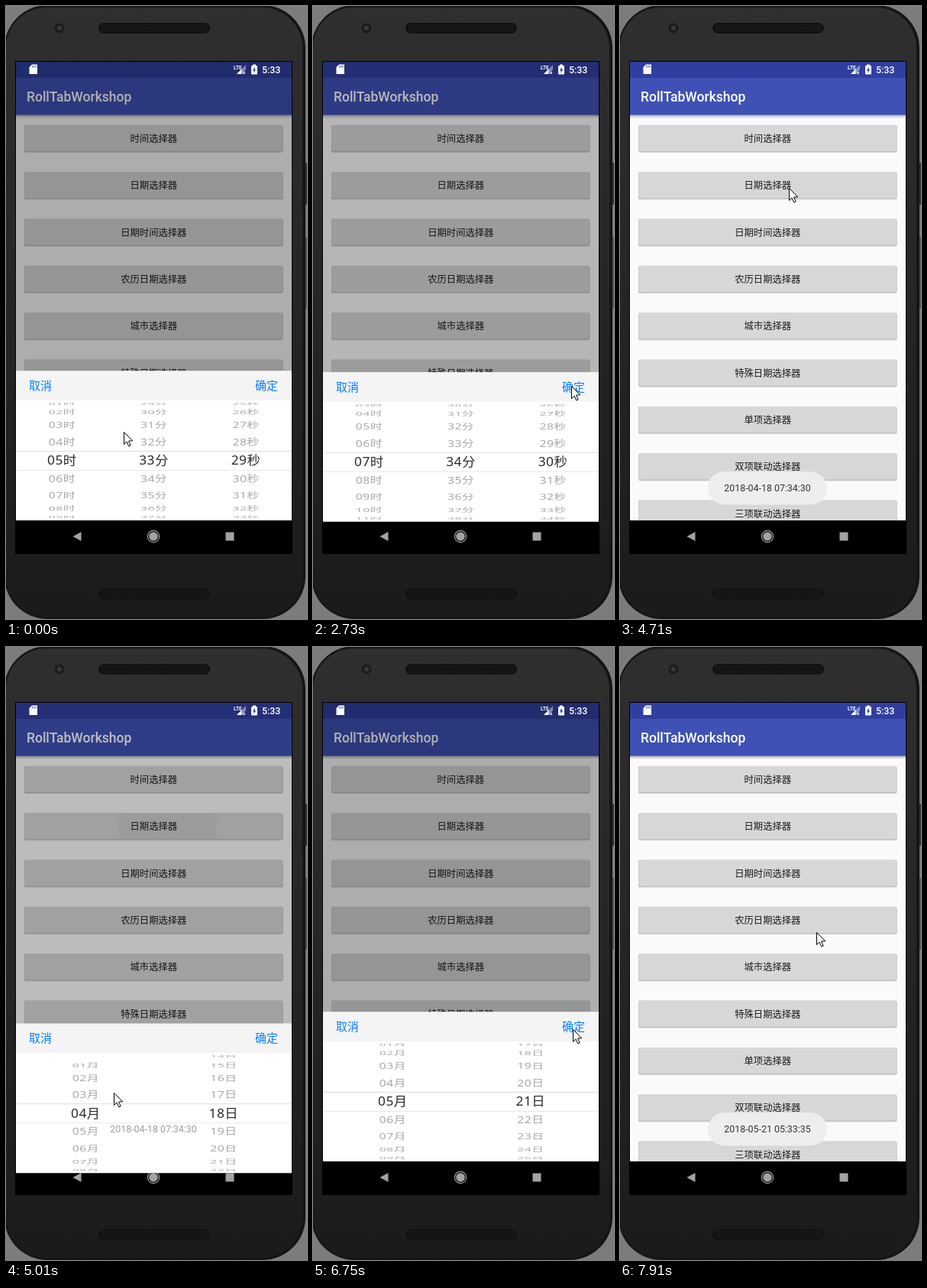
Animation, 394 px wide and 802 px high, one loop 8000 ms. Source, as an HTML page with a canvas:

```html
<!DOCTYPE html>
<html lang="zh">
<head>
<meta charset="utf-8">
<style>
html, body { margin: 0; width: 100%; height: 100%; overflow: hidden; background: #7c7c7c; }
canvas { display: block; }
</style>
</head>
<body>
<canvas id="stage" width="394" height="802"></canvas>
<script>
const c = document.getElementById('stage').getContext('2d');
const LOOP = 8000, TICK = 145;
const CJK = '"Noto Sans CJK SC", "Noto Sans CJK", sans-serif';
const UI = 'Roboto, ' + CJK;
const WHEEL = '"Noto Sans", "Noto Sans CJK SC", sans-serif';
const LABELS = ['时间', '日期', '日期时间', '农历日期', '城市', '特殊日期', '单项', '双项联动', '三项联动'];

// The picture refreshes every TICK, counted anew from each of these moments
const MOMENTS = [0, 1640, 2730, 3700, 5010, 6750, 7910];

// Pointer moves: start, end, x, y
const MOVES = [[120, 400, 84, 620], [400, 800, 80, 575], [800, 1060, 205, 600], [1480, 1640, 321, 575],
  [1780, 2450, 338, 497], [3600, 3700, 317, 475], [3700, 4280, 221, 238], [4710, 5010, 141, 583],
  [5010, 5580, 108, 595], [5580, 5850, 280, 620], [5850, 6450, 288, 552], [6450, 6750, 340, 500],
  [7490, 7910, 257, 373]];

const clamp = v => Math.max(0, Math.min(1, v));
const ramp = (t, start, end, a = 0, b = 1) => a + (b - a) * clamp((t - start) / (end - start));

function box(x, y, w, h, fill, r = 0) {
  c.fillStyle = fill;
  c.beginPath();
  c.roundRect(x, y, w, h, r);
  c.fill();
}

function disc(x, y, r, fill) {
  c.fillStyle = fill;
  c.beginPath();
  c.arc(x, y, r, 0, 7);
  c.fill();
}

function poly(fill, ...p) {
  c.fillStyle = fill;
  c.beginPath();
  for (let i = 0; i < p.length; i += 2) c.lineTo(p[i], p[i + 1]);
  c.closePath();
  c.fill();
}

function text(str, x, y, size, fill, align = 'center', family = CJK, weight = 400) {
  c.font = `${weight} ${size}px ${family}`;
  c.textAlign = align;
  c.fillStyle = fill;
  c.fillText(str, x, y);
}

function clipped(rects, draw) {
  c.save();
  c.beginPath();
  rects.forEach(r => c.rect(...r));
  c.clip();
  draw();
  c.restore();
}

function grille(y) {
  box(121, y, 146, 14, '#111', 7);
  c.fillStyle = '#2c2c2c';
  for (let j = 0; j < 5; j++)
    for (let x = 125 + j % 2; x < 264; x += 2.5) c.fillRect(x, y + 2 + j * 2.3, 1, 1);
}

function phone() {
  box(0, 0, 394, 802, '#7c7c7c');
  box(390, 205, 4, 55, '#333', 1);
  box(390, 302, 4, 94, '#555', 1);
  box(-2, -1, 394, 803, '#151515', 56);
  const g = c.createLinearGradient(0, 0, 0, 802);
  g.addColorStop(0, '#2f2f2f');
  g.addColorStop(0.5, '#252525');
  g.addColorStop(0.9, '#1d1d1d');
  g.addColorStop(1, '#1b1b1b');
  box(0, 2, 388, 797, g, 53);
  disc(70, 29, 6.5, '#1c1c1c');
  disc(70, 29, 3, '#3a3a3d');
  grille(22);
  grille(762);
  box(12, 72, 363, 645, '#000');
}

function page(t) {
  box(13, 73, 361, 600, '#fafafa');
  const shade = c.createLinearGradient(0, 142, 0, 147);
  shade.addColorStop(0, '#0005');
  shade.addColorStop(1, '#0000');
  box(13, 142, 361, 5, shade);
  box(13, 73, 361, 21, '#303f9f');
  box(13, 94, 361, 48.5, '#3f51b5');
  text('RollTabWorkshop', 27, 125, 17.5, '#fff', 'left', UI, 500);
  LABELS.forEach((label, i) => {
    const y = 155.8 + 61.35 * i;
    box(24, y, 338.5, 36.2, '#0002', 2);
    box(24, y + 0.5, 338.5, 34.8, '#b9baba', 2);
    box(24.3, y, 338, 34.3, '#d6d7d7', 2);
    if (i === 1 && t >= 4710 && t < 5290) clipped([[24.3, y, 338, 34.3]], () =>
      disc(212, 235, ramp(t, 4710, 5010, 12, 64), 'rgba(70,110,85,.06)'));
    text(label + '选择器', 193.3, Math.round(y + 22.2), 12.3, '#1c1c1c');
  });
}

function statusBar() {
  poly('#fff', 34, 76.5, 41, 76.5, 41, 89, 30.5, 89, 30.5, 80);
  c.fillStyle = '#303f9f';
  for (const x of [34.2, 36.4, 38.6]) c.fillRect(x, 78, 1, 2.5);
  text('LTE', 298, 82.5, 6.6, '#fff', 'left', UI, 700);
  poly('#ffffff70', 302, 89, 314, 77, 314, 83, 309, 89);
  poly('#fff', 302, 89, 308.5, 82.5, 308.5, 89);
  text('×', 311.5, 90, 7, '#fff', 'center', UI, 700);
  box(323, 76.5, 4, 2, '#fff');
  box(321, 78, 8, 11.5, '#fff', 1);
  poly('#303f9f', 325.6, 79.5, 323, 84.5, 324.6, 84.5, 324.4, 88, 327, 83, 325.6, 83);
  text('5:33', 335, 87.7, 12.4, '#fff', 'left', UI, 500);
}

function navBar() {
  box(13, 673, 362, 44, '#000');
  poly('#a3a3a3', 87.5, 694, 98.5, 688, 98.5, 700);
  disc(193, 694, 8.2, '#a3a3a3');
  disc(193, 694, 7, '#000');
  disc(193, 694, 5.8, '#a3a3a3');
  box(287.5, 688.5, 11, 11, '#a3a3a3');
}

// Rows sit on a cylinder, 18 degrees apart
function wheel(x, cy, value, unit, zoom, fill) {
  c.letterSpacing = '0.4px';
  for (let i = Math.max(1, Math.round(value) - 5); i < value + 5; i++) {
    const a = (i - value) * Math.PI / 10;
    if (Math.abs(a) >= 1.5) continue;
    c.save();
    c.translate(x, cy + 78 * Math.sin(a));
    c.scale(zoom, Math.cos(a) * (zoom > 1 ? 1 : 0.8));
    text(String(i).padStart(2, '0') + unit, 0, 5.6, 15.8, fill, 'center', WHEEL);
    c.restore();
  }
  c.letterSpacing = '0px';
}

function sheet(drop, cols) {
  clipped([[13, 73, 361, 643]], () => {
    c.translate(0, drop);
    box(13, 477.5, 361, 195.5, '#fff');
    box(13, 477.5, 361, 38.5, '#f4f4f4');
    text('取消', 30, 502, 15, '#057dff', 'left');
    text('确定', 356, 502, 15, '#057dff', 'right');
    const cy = 594.7, top = 582, bottom = 607;
    const rows = (zoom, fill) => () => cols.forEach(([x, v, unit]) => wheel(x, cy, v, unit, zoom, fill));
    clipped([[13, 516, 361, top - 516], [13, bottom, 361, 673 - bottom]], rows(1, '#a8a8a8'));
    clipped([[13, top, 361, bottom - top]], rows(1.1, '#2a2a2a'));
    box(13, top, 361, 1, '#dcdcdc');
    box(13, bottom, 361, 1, '#e8e8e8');
  });
}

// Dims the page at once and returns the sheet to draw above the bars
function picker(t, open, close, cols) {
  const p = ramp(t, open, open + 300), q = ramp(t, close, close + 300);
  if (p === 0 || q === 1) return () => {};
  const dim = 0.31 * (1 - (1 - p) ** 1.3) * (1 - q);
  box(13, 73, 361, 600, `rgba(0,0,0,${dim})`);
  return () => sheet(196 * ((1 - p) ** 2 + q ** 2.2), cols);
}

function toast(str, alpha) {
  c.globalAlpha = alpha ** 4;
  box(115, 609, 156, 43.5, 'rgba(238,238,238,.97)', 21.7);
  c.globalAlpha = alpha;
  text(str, 193, 635.4, 12.4, '#333', 'center', UI);
  c.globalAlpha = 1;
}

function pointer(t) {
  let x = 154, y = 557;
  for (const [start, end, toX, toY] of MOVES) {
    x = ramp(t, start, end, x, toX);
    y = ramp(t, start, end, y, toY);
  }
  c.save();
  c.translate(Math.round(x) + 0.5, Math.round(y) + 0.5);
  c.strokeStyle = '#000';
  c.lineWidth = 1;
  poly('#fff', 0, 0, 0, 16, 3.6, 12.6, 6.2, 18.4, 8.6, 17.4, 6.1, 11.6, 11.2, 11.3);
  c.stroke();
  c.restore();
}

function draw(t) {
  phone();
  page(t);
  const time = picker(t, -1000, 2694, [
    [73.3, ramp(t, 400, 800, 5, 7), '时'],
    [193.5, ramp(t, 1130, 1500, 33, 34), '分'],
    [314, ramp(t, 1780, 2100, 29, 30), '秒']]);
  const date = picker(t, 4794, 7186, [
    [104.3, ramp(t, 5150, 5580, 4, 5), '月'],
    [284.8, ramp(t, 5980, 6450, 18, 21), '日']]);
  statusBar();
  navBar();
  time();
  date();
  if (t >= 3150) toast('2018-04-18 07:34:30', ramp(t, 4860, 5150, 1, 0));
  if (t >= 7610) toast('2018-05-21 05:33:35', 1);
  pointer(t);
}

function tick() {
  const now = performance.now() % LOOP;
  const from = MOMENTS.findLast(m => m <= now);
  draw(now - (now - from) % TICK);
  requestAnimationFrame(tick);
}
tick();
</script>
</body>
</html>
```
